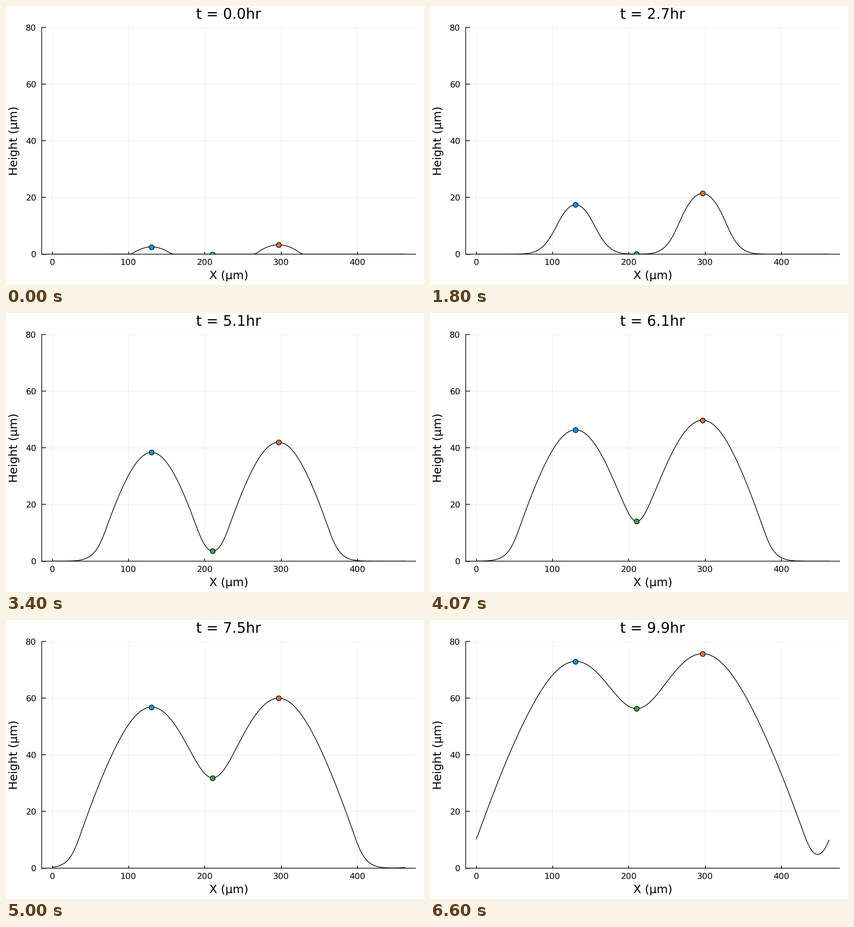
A matplotlib script for the animation above (6.67 s loop, 917 by 611 pixels).

```python
import matplotlib.pyplot as plt
import numpy as np
from matplotlib.animation import FuncAnimation

W, H, DPI = 917, 611, 100
FRAMES, INTERVAL = 100, 66.66
PERIOD, N = 463.0, 900
SUBSTEPS = 4
DT = 0.1 / SUBSTEPS

X = np.arange(N) * PERIOD / N
K2 = (2 * np.pi * np.fft.rfftfreq(N, PERIOD / N)) ** 2
BLUE, ORANGE, GREEN = 130.2, 296.6, 209.9
DOTS = {BLUE: "#009afa", ORANGE: "#e36f47", GREEN: "#3da44d"}

# Key heights that pin down the growth model: (hour, x, height)
KEYS = [(2.7, BLUE, 17.44), (2.7, ORANGE, 21.40),
        (6.1, BLUE, 46.35), (6.1, GREEN, 14.22),
        (9.9, ORANGE, 75.70), (9.9, GREEN, 56.40), (9.9, 447, 4.65)]

# growth, decay, active depth, diffusion, half-widths of both colonies
GUESS = np.array([0.9, 0.052, 12.0, 50.0, 24.4, 29.0])
SPREAD = np.array([0.2, 0.2, 0.2, 0.4, 0.03, 0.03])


def smooth(h, kernel):
    return np.fft.irfft(np.fft.rfft(h) * kernel, N)


def cap(center, height, half):
    return height * np.clip(1 - ((X - center) / half) ** 2, 0, None)


def simulate(params):
    """Height profiles of two colonies: dh/dt = a min(h, depth) - b h + D h_xx."""
    a, b, depth, diff, half1, half2 = params

    def rate(h):
        return a * np.minimum(h, depth) - b * h

    kernel = np.exp(-diff * K2 * DT)
    h = cap(BLUE, 2.57, half1) + cap(ORANGE, 3.32, half2)
    h = smooth(h, np.exp(-2 * K2))
    rows = [h]
    for _ in range(FRAMES - 1):
        for _ in range(SUBSTEPS):
            h = h + DT * rate(h + DT / 2 * rate(h))
            h = smooth(h, kernel)
        rows.append(h)
    return np.array(rows)


def calibrate(steps=8, eps=1e-3):
    """Gauss-Newton on log-parameters with a weak prior around GUESS."""
    def residual(z):
        rows = simulate(GUESS * np.exp(z))
        miss = [np.interp(x, X, rows[round(t * 10)]) - h for t, x, h in KEYS]
        return np.append(np.array(miss) / 0.1, z / SPREAD)

    z = np.zeros(len(GUESS))
    for _ in range(steps):
        r = residual(z)
        jac = np.column_stack([(residual(z + e) - r) / eps
                               for e in eps * np.eye(len(z))])
        z = z - np.clip(np.linalg.lstsq(jac, r, rcond=None)[0], -0.12, 0.12)
    return GUESS * np.exp(z)


def pt(px):
    return px * 72 / DPI


PROFILES = simulate(calibrate())

plt.rcParams["font.family"] = "DejaVu Sans"
plt.rcParams["text.hinting"] = "none"
plt.rcParams["path.snap"] = False

fig = plt.figure(figsize=(W / DPI, H / DPI), dpi=DPI, facecolor="white")
LEFT, BASE, WIDTH, HEIGHT = 78.4, 543.5, 820.2, 496.3
ax = fig.add_axes([LEFT / W, 1 - BASE / H, WIDTH / W, HEIGHT / H])
ax.set_xlim(-0.03 * X[-1], 1.03 * X[-1])
ax.set_ylim(0, 80)
ax.set_xticks(range(0, 401, 100))
ax.set_yticks(range(0, 81, 20))
ax.set_axisbelow(True)
ax.grid(color="black", alpha=0.09, lw=pt(1))
ax.spines[["top", "right"]].set_visible(False)
ax.spines[["left", "bottom"]].set_linewidth(pt(1.5))
for axis, length in (("x", 6), ("y", 9.8)):
    ax.tick_params(axis=axis, direction="in", length=pt(length), width=pt(1.5),
                   labelbottom=False, labelleft=False)


def label(x, y, text, size, ha="center", rotation=0):
    return fig.text(x / W, 1 - y / H, text, fontsize=pt(size), ha=ha,
                    va="baseline", rotation=rotation, rotation_mode="anchor")


for v in range(0, 401, 100):
    label(LEFT + (v / X[-1] + 0.03) / 1.06 * WIDTH, 567, str(v), 18.4)
for v in range(0, 81, 20):
    label(66.6, BASE - v / 80 * HEIGHT + 6.7, str(v), 18.4, ha="right")
label(489, 599, "X (µm)", 25.2)
label(25, 295.5, "Height (µm)", 25.2, rotation=90)
title = label(488.3, 27.5, "", 31.7)

curve, = ax.plot([], [], color="black", lw=pt(1.5), zorder=3)
dots = [ax.plot([], [], "o", ms=pt(10.8), mfc=color, mec="black",
                mew=pt(1.4), zorder=4)[0] for color in DOTS.values()]


def update(i):
    h = PROFILES[i]
    title.set_text(f"t = {i / 10:.1f}hr")
    curve.set_data(X, h)
    for dot, x in zip(dots, DOTS):
        dot.set_data([x], [np.interp(x, X, h)])
    return [title, curve, *dots]


anim = FuncAnimation(fig, update, frames=FRAMES, interval=INTERVAL, repeat=True)
plt.show()
```
